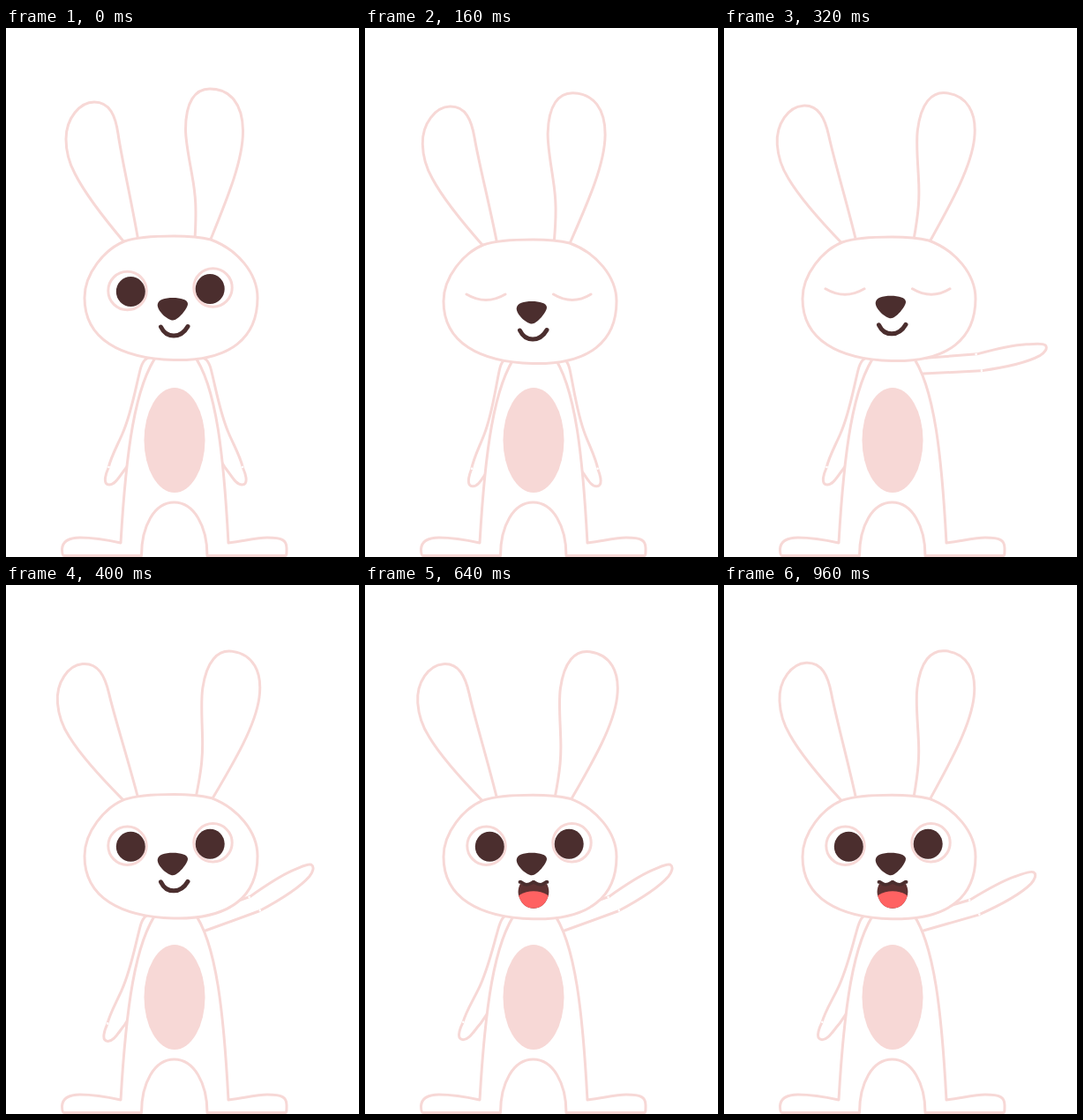
An HTML page for the animation above (1.4 s loop, 400x600 px).

```html
<!DOCTYPE html>
<html lang="en">
<head>
<meta charset="utf-8">
<title>Waving rabbit</title>
<style>
  html, body { margin: 0; width: 100%; height: 100%; overflow: hidden; background: #fff; }
  svg { display: block; width: 100%; height: 100%; }
  .line { fill: #fff; stroke: #f7d8d6; stroke-width: 3; stroke-linecap: round; stroke-linejoin: round; }
  .open { fill: none; }
  .gap { fill: none; stroke: #fff; stroke-width: 2.6; stroke-linecap: round; }
  .dark { fill: #4b2e2e; }
  .lip { fill: none; stroke: #4b2e2e; stroke-linecap: round; stroke-linejoin: round; }
</style>
</head>
<body>
<svg viewBox="0 0 400 600">
  <defs>
    <path id="mouth" d="M176 341 Q184 344 191 340 Q198 344 206 341 C209 347 209 352 207 357 C204 365 198 369 191 369 C184 369 178 365 175 357 C173 352 173 347 176 341 Z"/>
    <clipPath id="inside"><use href="#mouth"/></clipPath>
    <g id="hang">
      <path class="line" d="M168 374 C158 371 154 380 152 388 C146 412 142 437 132 460 C126 474 119 486 116 499 C112 508 110 518 117 518 C124 518 128 509 136 499 L160 460 L178 390 Z"/>
      <path class="gap" d="M116.500 498 h.01"/>
    </g>
    <g id="eye">
      <circle class="line" r="21.700"/>
    </g>
  </defs>

  <g id="leftArm"><use href="#hang"/></g>
  <g id="restArm" transform="translate(384.500 0) scale(-1 1)"><g id="restSwing"><use href="#hang"/></g></g>
  <g id="waveArm">
    <path class="line" id="armLine"/>
    <path class="gap" id="armGap"/>
  </g>

  <path class="line" d="M172 370 C146 405 136 480 130 584 C112 580 95 578 84 578 C68 578 64 584 63.500 591 Q63.500 598.500 66 598.500 H153.500 C153.500 565 168 538 190.500 538 C213 538 228 565 228 598.500 H316.500 C318 598.500 318 596 318 590 C318 581 313 578 296 578 C285 578 268 582 252 584 C247 490 239 405 212 370 Z"/>
  <ellipse cx="191" cy="467.500" rx="34.500" ry="59.500" fill="#f7d8d6"/>

  <path class="line" id="leftEar" d="M134 243 C118 224 92 193 78 165 C71 152 68 140 68 126 C68 102 84 84 100 84 C118 84 124 100 127 120 C131 148 143 200 150 242"/>
  <path class="line" id="rightEar" d="M214 240 C216 205 215 190 211 168 C208 150 203.500 130 203.500 115 C203.500 84 214 69 231 69 C254 69 268 86 268.500 116 C269 150 250 195 231 242"/>
  <path class="line" id="head" d="M190 236 C166 236 145 238 134 242 C112 251 89 278 89 306 C89 353 130 375 190 376.500 C256 378 285 350 285 306 C285 278 262 251 232 240 C220 237 205 236 190 236 Z"/>

  <g id="face">
    <g id="eyes">
      <use href="#eye" x="137.500" y="298"/>
      <ellipse class="dark" cx="141.300" cy="299" rx="16.500" ry="17"/>
      <use href="#eye" x="234.500" y="294.500"/>
      <ellipse class="dark" cx="231.200" cy="296" rx="16.500" ry="17"/>
    </g>
    <path class="line open" id="lids" d="M115 298 Q137 311 159 298 M213.500 298 Q235 311 256 298"/>
    <path class="dark" d="M171.700 314 C172 308 180 306 189 306 C198 306 206 308 206 313 C206 318 195 331.500 189 331.500 C183 331.500 171.500 321 171.700 314 Z"/>
    <path class="lip" id="smile" stroke-width="5" d="M175.500 339 C182 352.500 198 352.500 206 338.500"/>
    <g id="talk">
      <use href="#mouth" fill="#5e3232"/>
      <ellipse cx="191" cy="362" rx="21" ry="12.500" fill="#ff6262" clip-path="url(#inside)"/>
      <path class="lip" stroke-width="3.800" d="M175.500 339 C178 338.500 179 342 183 342 C187 342 189 340 191 339 C193 340 195 342 199 342 C203 342 204 338.500 206.500 339"/>
    </g>
  </g>
</svg>
<script>
const LOOP = 1400, STEP = 40, LAST = 960;
const el = id => document.getElementById(id);
const move = (id, value) => el(id).setAttribute("transform", value);
const show = (id, on) => { el(id).style.display = on ? "" : "none"; };

// Smooth 0..1 between two times
function ease(t, from, to) {
  const x = Math.min(1, Math.max(0, (t - from) / (to - from)));
  return x * x * (3 - 2 * x);
}

// Outline built from an upper arm and a forearm bent at the elbow
function drawArm(angle, bend) {
  const a = angle * Math.PI / 180, f = (angle + bend) * Math.PI / 180;
  const ex = 226 + 65 * Math.cos(a), ey = 392 - 65 * Math.sin(a);
  const c = Math.cos(f), s = Math.sin(f);
  const p = (x, y) => (ex + x * c + y * s).toFixed(2) + " " + (ey - x * s + y * c).toFixed(2);
  el("armLine").setAttribute("d",
    `M218 375 L${p(0, -19.5)} C${p(25, -20.5)} ${p(45, -20)} ${p(57, -18)}` +
    `C${p(66, -16)} ${p(75, -16)} ${p(78, -12)} C${p(80, -8)} ${p(75, -4)} ${p(69, -2)}` +
    `C${p(55, 2)} ${p(35, 3)} ${p(0, 0)} L226 392 L214 394 Z`);
  el("armGap").setAttribute("d", `M${p(-1, -19.5)} h.01 M${p(1, 0)} h.01`);
}

function draw(t) {
  const dip = 4 * ease(t, 0, 160), rise = ease(t, 160, 320);
  const head = dip - 3 * rise + 1.2 * ease(t, 320, 520);
  const settle = ease(t, 520, 800);
  const left = -5.2 * ease(t, 0, 480) + 2.7 * settle;
  const right = 8.5 * ease(t, 60, 420) - 1.8 * settle;
  const swing = -2.2 * ease(t, 0, 160) + 2.2 * rise + 2.6 * ease(t, 320, 560);

  move("head", `translate(0 ${head})`);
  move("face", `translate(0 ${dip - 6.2 * rise})`);
  move("leftEar", `translate(0 ${head}) rotate(${left} 142 243)`);
  move("rightEar", `translate(${right * .13} ${head + right * .25}) rotate(${right} 224 238)`);
  move("leftArm", `rotate(${swing} 165 383)`);
  move("restSwing", `rotate(${swing} 165 383)`);

  const lift = ease(t, 158, 382);
  const wave = t > 480 ? 4 * Math.sin(Math.PI * (t - 480) / 160) ** 2 : 0;
  drawArm(-72 + 92 * lift + wave - 4 * ease(t, 880, 960), -3 + 16 * lift);

  const raised = t > 160, blink = t >= 120 && t < 400, talk = t >= 560;
  show("restArm", !raised);
  show("waveArm", raised);
  show("eyes", !blink);
  show("lids", blink);
  show("smile", !talk);
  show("talk", talk);
}

const start = performance.now();
function tick() {
  const t = (performance.now() - start) % LOOP;
  draw(Math.min(Math.floor(t / STEP) * STEP, LAST));
  requestAnimationFrame(tick);
}
draw(0);
requestAnimationFrame(tick);
</script>
</body>
</html>
```
